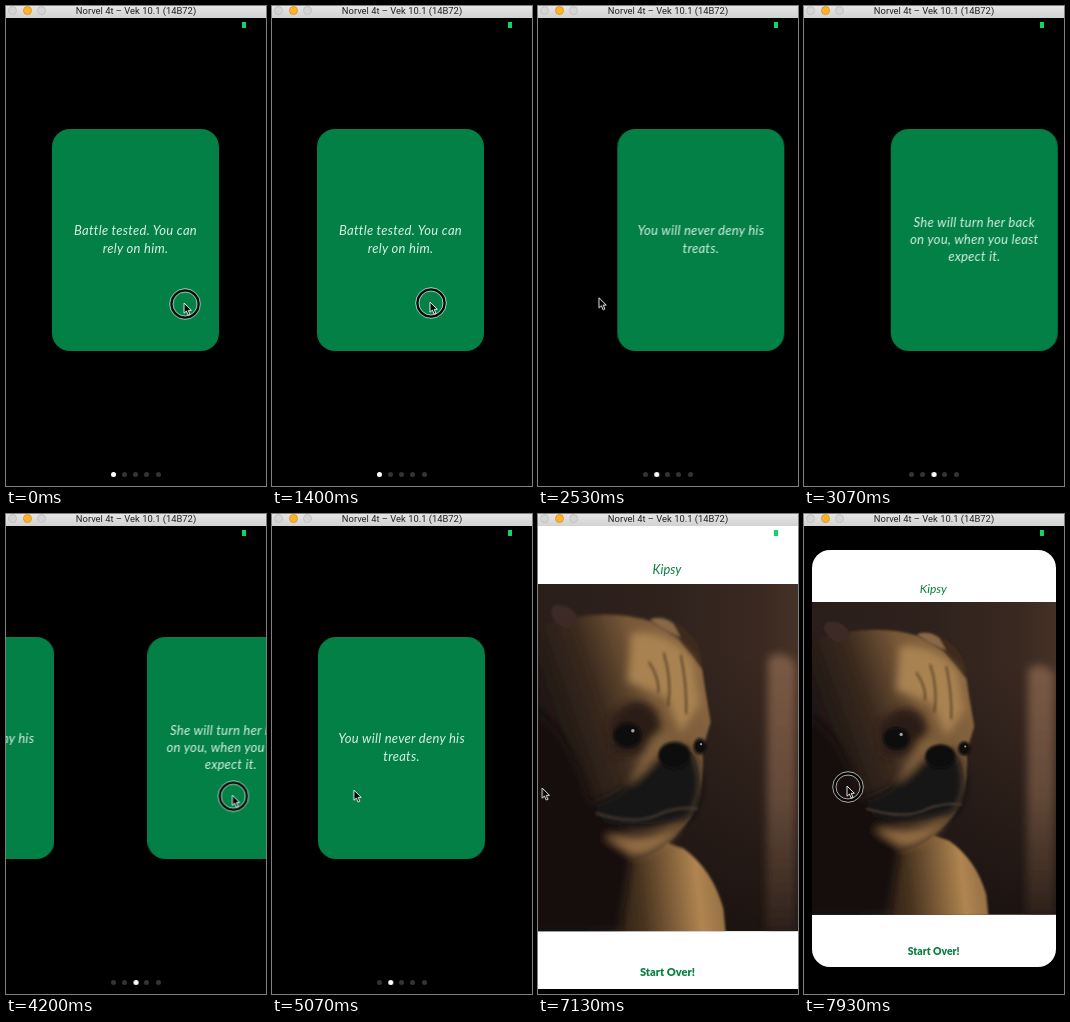
Animation of 260 by 480 pixels, one loop 8000 ms. Source, as an HTML page:

```html
<!DOCTYPE html>
<html lang="en">
<head>
<meta charset="utf-8">
<title>Pet cards</title>
<style>
html, body { margin: 0; width: 100%; height: 100%; overflow: hidden; background: #000; }
.stage { position: relative; width: 260px; height: 480px; overflow: hidden; background: #000; }
.stage * { box-sizing: border-box; }
.app, .page, .strip, .cursor { position: absolute; left: 0; top: 0; }
.app { width: 260px; height: 480px; overflow: hidden; perspective: 347px; perspective-origin: 130px 243px; }
.page { width: 260px; height: 480px; transform-origin: 130px 243px; }
.page, .strip, .dot.on, .snap, .cursor, .ring { animation: 8s linear infinite; }

/* Title bar */
.bar { position: absolute; left: 0; top: 0; width: 260px; height: 11.5px; background: linear-gradient(#e6e5e6, #d3d2d3);
  color: #222; font: 9.4px/9px Roboto, sans-serif; text-align: center; white-space: nowrap; }
.light { position: absolute; top: 0; width: 9px; height: 9px; border-radius: 50%; background: #d6d5d6; border: .5px solid #c3c2c3; }
.light.mid { background: #fdb32b; border-color: #dc9a25; }
.battery { position: absolute; left: 236px; top: 16px; width: 3.5px; height: 6px; background: #0fd46c; }

/* Cards */
.strip { animation-name: strip; }
.card { position: absolute; top: 123px; width: 167px; height: 221.5px; border-radius: 18px; background: #028045;
  color: #d9efe4; font: italic 13px/17.4px Lato, sans-serif; letter-spacing: .27px; text-align: center; white-space: nowrap;
  display: flex; align-items: center; justify-content: center; }
.card:nth-child(1) { left: 46px; }
.card:nth-child(2) { left: 306px; }
.card:nth-child(3) { left: 566px; }
.dot { position: absolute; top: 465.5px; width: 5px; height: 5px; border-radius: 50%; background: #343434; }
.dot.on { left: 104.5px; background: #fff; animation-name: dot; animation-timing-function: step-end; }
.page { animation-name: page; }

/* Reveal */
.snap { position: absolute; overflow: hidden; background: #fff; animation-name: snap; }
.snap svg { display: block; width: 100%; height: 100%; }
.snap text { font-family: Lato, sans-serif; fill: #08803f; text-anchor: middle; }

.cursor { width: 1px; height: 1px; overflow: visible; animation-name: cursor; }
.ring { animation-name: ring; animation-timing-function: step-end; }

@keyframes strip {
  0%, 16.875% { transform: translateX(0); }
  17.5% { transform: translateX(-1px); }
  26.625% { transform: translateX(-9px); animation-timing-function: ease-in; }
  29.75% { transform: translateX(-117px); animation-timing-function: ease-out; }
  33%, 33.75% { transform: translateX(-260px); }
  37.25% { transform: translateX(-440px); }
  38.375% { transform: translateX(-479px); animation-timing-function: ease-out; }
  42.5%, 47.5% { transform: translateX(-520px); }
  53.125% { transform: translateX(-413px); animation-timing-function: ease-out; }
  57%, 100% { transform: translateX(-260px); }
}
@keyframes dot {
  0% { transform: translateX(0); }
  30% { transform: translateX(11.3px); }
  37% { transform: translateX(22.6px); }
  53.4% { transform: translateX(11.3px); }
}
@keyframes page {
  0%, 72.15% { transform: rotateY(0); opacity: 1; }
  74.525% { transform: rotateY(-90deg); opacity: 1; }
  74.53%, 100% { transform: rotateY(-90deg); opacity: 0; }
}
@keyframes snap {
  0%, 74.52% { left: 46px; top: 123px; width: 167px; height: 222px; border-radius: 18px; transform: rotateY(90deg); opacity: 0; }
  74.525% { transform: rotateY(90deg); opacity: 1; }
  76.9% { left: 46px; top: 123px; width: 167px; height: 222px; transform: rotateY(0); }
  78.375% { left: 16.5px; top: 56px; width: 226px; height: 371px; }
  79.27% { left: 0; top: 12px; width: 260px; height: 463px; border-radius: 18px; }
  79.3%, 91.85% { border-radius: 0; }
  91.875% { left: 0; top: 12px; width: 260px; height: 463px; border-radius: 18px; animation-timing-function: ease-in; }
  99.125% { left: 7.5px; top: 35.5px; width: 244.5px; height: 417px; }
  100% { left: 9px; top: 39px; width: 242px; height: 411px; border-radius: 18px; transform: rotateY(0); opacity: 1; }
}
@keyframes cursor {
  0% { transform: translate(178px, 297px); animation-timing-function: ease-out; }
  3.75% { transform: translate(190px, 298px); animation-timing-function: ease-in-out; }
  10.625% { transform: translate(172px, 295px); }
  17.5% { transform: translate(158px, 296px); }
  26.625% { transform: translate(148px, 298px); animation-timing-function: ease-in; }
  29.75%, 31.25% { transform: translate(40px, 292px); }
  33.75% { transform: translate(175px, 290px); }
  37.25%, 39% { transform: translate(-30px, 288px); animation-timing-function: ease-out; }
  43.5%, 47.5% { transform: translate(131px, 283px); }
  53.125% { transform: translate(238px, 281px); }
  58.125% { transform: translate(238px, 279px); animation-timing-function: ease-in-out; }
  63.375% { transform: translate(82px, 276px); }
  66.25% { transform: translate(52px, 277px); animation-timing-function: ease-in-out; }
  69.5%, 71.25% { transform: translate(75px, 280px); animation-timing-function: ease-in-out; }
  78.375%, 80.25% { transform: translate(143px, 285px); animation-timing-function: ease-in-out; }
  89.375%, 91.875% { transform: translate(4px, 274px); animation-timing-function: ease-in; }
  99.125% { transform: translate(43px, 272px); }
  100% { transform: translate(46px, 272px); }
}
@keyframes ring {
  0%, 33.75%, 47.5%, 69.75%, 91.875%, 100% { opacity: 1; }
  29.75%, 37.25%, 53.125%, 71.25% { opacity: 0; }
}
</style>
</head>
<body>
<div class="stage">
  <div class="app">
    <div class="page">
      <div class="strip">
        <div class="card"><span>Battle tested. You can<br>rely on him.</span></div>
        <div class="card"><span>You will never deny his<br>treats.</span></div>
        <div class="card"><span>She will turn her back<br>on you, when you least<br>expect it.</span></div>
      </div>
      <i class="dot" style="left:104.5px"></i>
      <i class="dot" style="left:115.8px"></i>
      <i class="dot" style="left:127.1px"></i>
      <i class="dot" style="left:138.4px"></i>
      <i class="dot" style="left:149.7px"></i>
      <i class="dot on"></i>
    </div>
    <div class="snap">
      <svg viewBox="8 36 244 416" preserveAspectRatio="none">
        <defs>
          <linearGradient id="wall">
            <stop offset="0" stop-color="#2a1e1b"/>
            <stop offset=".5" stop-color="#2f221d"/>
            <stop offset=".85" stop-color="#3a2921"/>
            <stop offset="1" stop-color="#453126"/>
          </linearGradient>
          <linearGradient id="shade" x2="0" y2="1">
            <stop offset=".2" stop-color="#17100e" stop-opacity="0"/>
            <stop offset="1" stop-color="#17100e" stop-opacity=".85"/>
          </linearGradient>
          <linearGradient id="post" x2="0" y2="1">
            <stop offset="0" stop-color="#7a5a45"/>
            <stop offset=".5" stop-color="#654a39"/>
            <stop offset="1" stop-color="#2e211b"/>
          </linearGradient>
          <linearGradient id="fur" gradientUnits="userSpaceOnUse" x1="15" y1="215" x2="165" y2="160">
            <stop offset="0" stop-color="#1c1412"/>
            <stop offset=".35" stop-color="#3a2a1f"/>
            <stop offset=".65" stop-color="#785837"/>
            <stop offset="1" stop-color="#8a6741"/>
          </linearGradient>
          <linearGradient id="chest" gradientUnits="userSpaceOnUse" x1="50" y1="380" x2="186" y2="365">
            <stop offset="0" stop-color="#15100e"/>
            <stop offset=".4" stop-color="#46321f"/>
            <stop offset=".8" stop-color="#b08550"/>
            <stop offset="1" stop-color="#8f6b42"/>
          </linearGradient>
          <filter id="soft" x="-30%" y="-30%" width="160%" height="160%"><feGaussianBlur stdDeviation="4"/></filter>
          <filter id="edge"><feGaussianBlur stdDeviation="1.2"/></filter>
          <clipPath id="photo"><path d="M8 88H252V400H8Z"/></clipPath>
        </defs>
        <g clip-path="url(#photo)">
          <path d="M8 88H252V400H8Z" fill="url(#wall)"/>
          <path d="M8 88H252V400H8Z" fill="url(#shade)"/>
          <path d="M224 155Q238 145 250 160V400H222Z" fill="url(#post)" filter="url(#soft)"/>
          <g filter="url(#edge)">
            <path d="M0 250L70 300 145 326Q172 345 182 380L185 410H0Z" fill="url(#chest)"/>
            <path d="M0 130Q60 106 115 122L160 150Q164 180 170 212L162 238Q166 270 150 300 125 332 98 336 40 340 0 300Z" fill="url(#fur)"/>
            <path d="M22 108Q38 104 47 121L34 128Q22 122 20 114Z" fill="#3c2c25"/>
            <path d="M112 121Q125 115 137 123 164 138 162 165 148 148 138 136Z" fill="#3d2b1e"/>
            <path d="M113 120Q124 116 135 124L142 136Q126 130 113 120Z" fill="#8a6847"/>
          </g>
          <g filter="url(#soft)">
            <path d="M0 200Q35 215 55 280L98 318 85 400H0Z" fill="#17100f"/>
            <path d="M96 132Q128 128 153 156L160 196 142 222 128 190 92 176Z" fill="#a88251"/>
            <path d="M75 210Q100 180 120 204L125 226 108 242 78 242Z" fill="#2a1c14"/>
            <path d="M112 232Q124 210 140 232L118 258 92 270Z" fill="#80603c"/>
            <path d="M60 285Q95 272 116 248 140 224 155 242 168 275 150 299 110 312 70 303Z" fill="#171212"/>
            <path d="M70 314Q110 320 142 306 120 334 98 332Z" fill="#916c43"/>
          </g>
          <g filter="url(#edge)" stroke="#3a2819" fill="none">
            <path d="M126 150Q134 175 130 198M142 152Q148 180 147 205M112 158Q122 172 121 186" stroke-width="2" opacity=".6"/>
            <path d="M62 294Q100 306 124 294 140 288 158 290" stroke="#493b33" stroke-width="2"/>
            <g fill="#0f0b0b" stroke="none">
              <ellipse cx="92" cy="224" rx="13" ry="11"/>
              <ellipse cx="160" cy="234" rx="6" ry="7"/>
              <ellipse cx="136" cy="242" rx="15" ry="12"/>
            </g>
          </g>
          <circle cx="97" cy="220" r="1.6" fill="#a9a39b"/>
          <circle cx="161" cy="232" r="1" fill="#a9a39b"/>
        </g>
        <text x="129" y="79" font-size="12" font-style="italic">Kipsy</text>
        <text x="129.5" y="440.5" font-size="10.4" font-weight="900">Start Over!</text>
      </svg>
    </div>
  </div>
  <i class="battery"></i>
  <div class="bar">
    <i class="light" style="left:2px"></i><i class="light mid" style="left:16.5px"></i><i class="light" style="left:31px"></i>
    Norvel 4t – Vek 10.1 (14B72)
  </div>
  <svg class="cursor">
    <g class="ring" fill="none">
      <circle cx="1" cy="1" r="13.6" stroke="#000" stroke-opacity=".9" stroke-width="3"/>
      <circle cx="1" cy="1" r="15.3" stroke="#fff" stroke-opacity=".75" stroke-width=".9"/>
      <circle cx="1" cy="1" r="12" stroke="#fff" stroke-opacity=".75" stroke-width=".9"/>
    </g>
    <path d="M0 0V10.2L2.4 8 4.1 12 5.9 11.2 4.2 7.3H7.3Z" fill="#000" stroke="#fff" stroke-width=".9"/>
  </svg>
</div>
</body>
</html>
```
